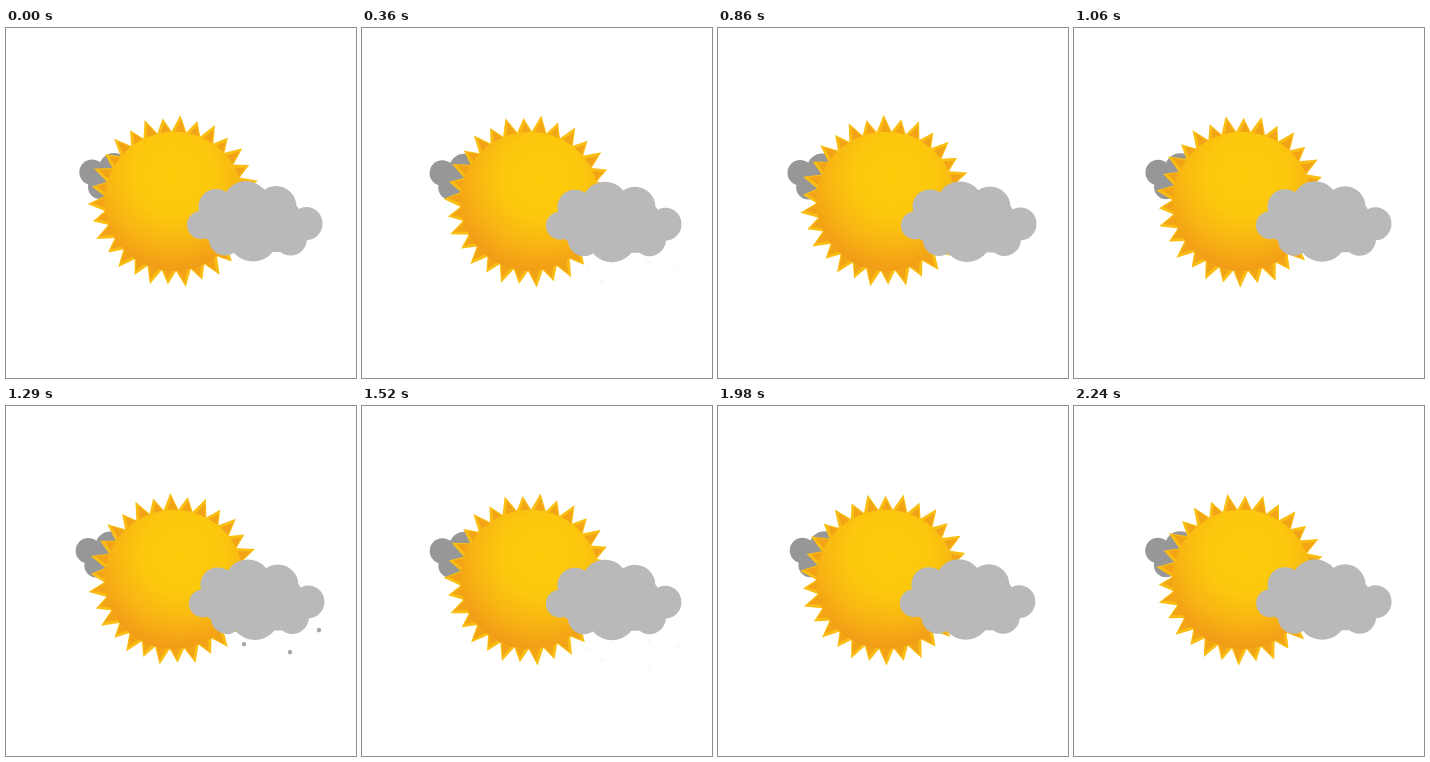
Animation, 350 px wide and 350 px high, one loop 2.28 s. Source, as an HTML page without scripts:

```html
<!DOCTYPE html>
<html lang="en">
<head>
<meta charset="utf-8">
<title>Sun and clouds</title>
<style>
@property --u { syntax: "<number>"; inherits: true; initial-value: 0; }

html, body { margin: 0; width: 100%; height: 100%; overflow: hidden; background: #fff; }
svg { display: block; width: 100vw; height: 100vh; animation: sway 2280ms linear infinite; }

/* one sway value drives the sun and both clouds */
@keyframes sway {
  0%, 4.38% { --u: 0; }
  15.79% { --u: .82; }
  25.6% { --u: 1; }
  37.72% { --u: .55; }
  48.7% { --u: .2; }
  56.58% { --u: .52; }
  73.7%, 75.44% { --u: 1; }
  86.84%, 89.9% { --u: .225; }
  98.25%, 99.99% { --u: .3; }
  100% { --u: 0; }
}

.sun { transform: translate(168px, 173.3px) rotate(calc(var(--u) * 33.3deg)); }
.back { fill: #979797; transform: translate(calc(var(--u) * -7px), calc(var(--u) * .8px)); }
.front { fill: #b9b9b9; transform: translate(calc(var(--u) * 3.6px), calc(var(--u) * .8px)); }

.rain { fill: #a6a6a6; animation: fall 1140ms linear infinite, fade 1140ms linear infinite; }
@keyframes fall {
  0% { transform: translate(-1.6px, -10.8px); }
  61.4%, 100% { transform: translate(5.8px, 39.6px); }
}
@keyframes fade {
  0%, 8.8% { opacity: 0; }
  12%, 15% { opacity: 1; }
  30% { opacity: .06; }
  51% { opacity: .06; }
  61.4%, 100% { opacity: 0; }
}
</style>
</head>
<body>
<svg viewBox="0 0 350 350" role="img" aria-label="Sun between two clouds">
  <defs>
    <radialGradient id="glow" gradientUnits="userSpaceOnUse" cx="0" cy="-26" r="96">
      <stop offset="0" stop-color="#fdcb0a"/>
      <stop offset=".42" stop-color="#fcc80d"/>
      <stop offset=".7" stop-color="#f8b513"/>
      <stop offset="1" stop-color="#f19a17"/>
    </radialGradient>
    <g id="pair">
      <path fill="#fabd12" d="M-8.500-67L0-86.500 8.500-67z"/>
      <path fill="#f2a416" d="M-5-67L1-82 7-67z"/>
      <g transform="rotate(12)">
        <path fill="#fabd12" d="M-8.500-67L0-83.500 8.500-67z"/>
        <path fill="#f2a416" d="M-5-67L1-79 7-67z"/>
      </g>
    </g>
    <g id="third">
      <use href="#pair"/>
      <use href="#pair" transform="rotate(24)"/>
      <use href="#pair" transform="rotate(48)"/>
      <use href="#pair" transform="rotate(72)"/>
      <use href="#pair" transform="rotate(96)"/>
    </g>
  </defs>

  <g class="back">
    <circle cx="86" cy="144.300" r="12.700"/>
    <circle cx="108" cy="140" r="15"/>
    <circle cx="94" cy="159" r="12"/>
    <path d="M86 140h40v28H94z"/>
  </g>

  <g class="sun">
    <g transform="rotate(4.2)">
      <use href="#third"/>
      <use href="#third" transform="rotate(120)"/>
      <use href="#third" transform="rotate(240)"/>
    </g>
    <circle r="69.500" fill="url(#glow)"/>
  </g>

  <g class="rain">
    <circle cx="238" cy="238" r="2.200"/>
    <circle cx="284" cy="246" r="2.200"/>
    <circle cx="313" cy="224" r="2.200"/>
    <circle cx="223" cy="226" r="2.200"/>
    <circle cx="284" cy="219" r="2.200"/>
  </g>

  <g class="front">
    <ellipse cx="195" cy="197" rx="14" ry="14"/>
    <circle cx="210" cy="178.500" r="17.500"/>
    <ellipse cx="240" cy="178" rx="24" ry="25"/>
    <circle cx="270" cy="178.500" r="20.500"/>
    <ellipse cx="300.500" cy="195.500" rx="16" ry="16.500"/>
    <circle cx="284.500" cy="211" r="16.500"/>
    <ellipse cx="247" cy="211" rx="24" ry="22.500"/>
    <circle cx="219" cy="211.500" r="16"/>
    <path d="M196 178h95l12 20-4 14-20 12h-58l-22-14z"/>
  </g>
</svg>
</body>
</html>
```
